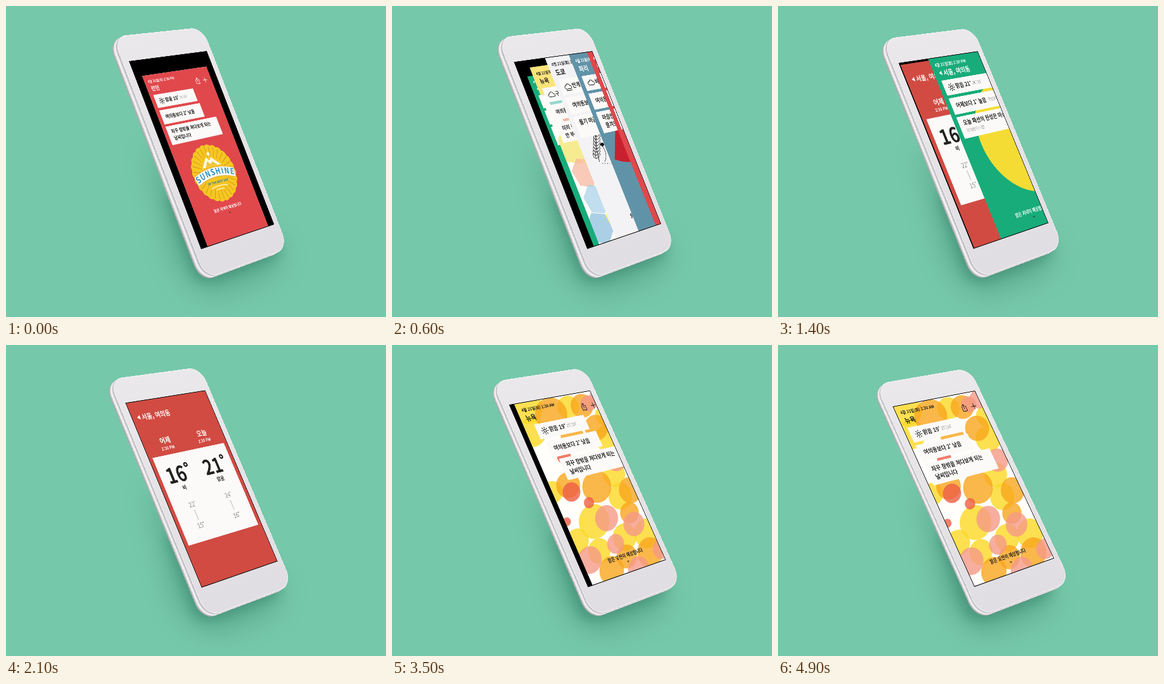
Animation of 600x491 px, one loop 5000 ms. Source, as an HTML page:

```html
<!DOCTYPE html>
<html lang="ko">
<head>
<meta charset="utf-8">
<style>
html, body { margin: 0; width: 100%; height: 100%; overflow: hidden; background: #76c8aa; }
body { position: relative; }
.plane { position: absolute; left: 0; top: 0; width: 0; height: 0; transform-origin: 0 0; }
.body { position: absolute; left: -25px; top: -77px; width: 365px; height: 727px; border-radius: 50px; }
.face { background: linear-gradient(#eae8eb, #e4e2e5 60%, #e0dee2); box-shadow: inset 0 0 0 2px #f3f2f4; }
#shadow { position: absolute; left: 0; top: 0; }
#screen { position: absolute; left: 0; top: 0; width: 320px; height: 568px; overflow: hidden; background: #000; }
text { font-family: "Noto Sans CJK KR", "Noto Sans CJK", "Noto Sans", sans-serif; }
</style>
</head>
<body>
<svg id="shadow" width="600" height="491">
  <path d="M225 220L262 385Q285 455 340 452L425 420L435 380L320 300Z" fill="#2f7a62" opacity=".36" style="filter:blur(22px)"/>
  <path d="M250 300L295 425Q305 440 335 434L428 398L435 380L320 300Z" fill="#2f7a62" opacity=".42" style="filter:blur(9px)"/>
</svg>
<script>
const W = 320, H = 568, LOOP = 5000, SMALL = 0.83;
// Undoes the tilt of the plane, so that shapes given in stage pixels stand upright
const UPRIGHT = 'matrix(2.19 .49 -1.01 1.81 0 0)';
const clamp = v => Math.max(0, Math.min(1, v));
const smooth = v => { v = clamp(v); return v * v * (3 - 2 * v); };
const lerp = (a, b, p) => a + (b - a) * p;

// ---- drawing helpers ----
const txt = (x, y, size, fill, s, more = '') =>
  `<text x="${x}" y="${y + size * 0.36}" font-size="${size}" fill="${fill}" ${more}>${s}</text>`;
const mid = 'text-anchor="middle"', bold = 'font-weight="700"';
const circle = (x, y, r, fill, more = '') => `<circle cx="${x}" cy="${y}" r="${r}" fill="${fill}" ${more}/>`;
const rect = (x, y, w, h, fill) => `<rect x="${x}" y="${y}" width="${w}" height="${h}" fill="${fill}"/>`;
const line = (d, color, w = 2, more = '') => `<path d="${d}" fill="none" stroke="${color}" stroke-width="${w}" ${more}/>`;
const group = (id, s) => `<g id="${id}" clip-path="url(#sheet)">${s}</g>`;

const icons = {
  sun: circle(0, 0, 4.5, 'none', 'stroke="#222" stroke-width="2.4"') +
    circle(0, 0, 10, 'none', 'stroke="#222" stroke-width="4.5" stroke-dasharray="2.4 5.45"'),
  cloud: line('M-9 7h17a5 5 0 0 0 0-10a8 8 0 0 0-15-1a5.5 5.5 0 0 0-2 11z', '#222')
};
icons.fog = icons.cloud + line('M-11 12h22', '#222');

const cards = [[73, 48], [130, 52], [190, 68]];
const paper = (i, w, s) =>
  `<g class="card">${rect(17, cards[i][0], w, cards[i][1], '#fbfaf8')}${s}</g>`;
const word = (x, y, s) => txt(x, y, 18, '#222', s, bold);
const note = (x, y, s) => txt(x, y, 12.5, '#8d8d8d', s);

function page(id, o) {
  const ink = o.ink || '#fff', x = o.back ? 37 : 19;
  return group(id,
    rect(0, 0, W, 720, o.bg) + (o.art || '') +
    txt(16, 24, 13, ink, `4월 21일(화) ${o.time || '2:30 PM'}`, bold) +
    (o.back ? `<path d="M20 50L31 43V57Z" fill="${ink}"/>` : '') +
    txt(x, 50, 21, ink, o.city, bold) +
    line('M245 44H241V59H257V44H253M249 53V37M244.500 41L249 36.500L253.500 41M278 49H298M288 39V59', ink, 2) +
    paper(0, 195, `<g transform="translate(46 98)">${icons[o.icon]}</g>` + word(63, 97, o.now) + note(132, 97, o.range)) +
    paper(1, o.w2 || 200, word(35, 156, o.diff) + note(168, 156, o.more || '')) +
    paper(2, o.w3 || 255, word(35, 211, o.say[0]) + (o.sub ? note(38, 236, o.sub) : word(37, 236, o.say[1]))) +
    txt(160, 517, 14.5, ink, o.foot || '맑은 저녁이 예상됩니다', mid + ' ' + bold) +
    `<path d="M155 534H165L160 540Z" fill="#333" opacity=".75"/>`);
}

// ---- page artwork ----
function badge() {
  let d = '';
  for (let i = 0; i <= 144; i++) {
    const a = i / 144 * Math.PI * 2, r = 102 + 4 * Math.abs(Math.sin(a * 12));
    d += `${i ? 'L' : 'M'}${(160 + r * Math.cos(a)).toFixed(1)} ${(387 + r * Math.sin(a)).toFixed(1)}`;
  }
  return `<path d="${d}Z" fill="#f5c722"/>` +
    circle(160, 387, 79, 'none', 'stroke="#d9961f" stroke-width="38" stroke-dasharray="2.6 14.9"') +
    `<path d="M113 362L146 326L158 340L169 329L207 362Z" fill="#fff8e4"/>` +
    `<path d="M128 362L146 341L158 354L169 345L190 362Z" fill="#eec63a"/>` +
    circle(164, 316, 7, '#fff') +
    `<path d="M58 385Q160 347 262 385L256 420Q160 384 64 420Z" fill="#fdfaf2" stroke="#e2a526" stroke-width="2"/>` +
    `<path id="arc" d="M70 410Q160 378 250 410" fill="none"/>` +
    `<text font-size="31" font-weight="700" fill="#2b8fc4" letter-spacing="4" ${mid}>` +
    `<textPath href="#arc" startOffset="51%">SUNSHINE</textPath></text>` +
    txt(160, 421, 12, '#2477a8', 'OF THE BEST SKY', mid + ' ' + bold) +
    line('M118 440Q160 430 202 440M140 449Q160 444 180 449', '#fff4cf', 3);
}

// x, y on the page and radius in stage pixels
const blobs = {
  '#fcd926': [40, 20, 24, 20, 95, 22, 190, 40, 18, 318, 87, 17, 285, 160, 21, 250, 275, 19, 1, 281, 16, 102, 395, 25,
    237, 344, 20, 13, 436, 18, 74, 481, 18, 186, 465, 20, 275, 474, 22],
  '#f9a61f': [116, 52, 26, 244, 44, 19, 262, 120, 20, 157, 133, 19, 66, 272, 19, 166, 298, 24, 286, 334, 20,
    244, 400, 16, 163, 521, 17, 255, 531, 22, 88, 545, 20],
  '#f69a88': [272, 40, 13, 318, 30, 15, 282, 232, 18, 151, 396, 19, 242, 436, 18, 28, 497, 19, 143, 476, 14,
    304, 532, 15, 186, 567, 18],
  '#ee5f45': [67, 294, 14, 112, 338, 8, 6, 374, 6, 95, 186, 11]
};
function watercolor() {
  let s = '';
  for (const color in blobs) {
    const b = blobs[color];
    for (let i = 0; i < b.length; i += 3)
      s += `<g transform="translate(${b[i]} ${b[i + 1]}) ${UPRIGHT}"><ellipse rx="${b[i + 2] * 0.98}" ry="${b[i + 2] * 1.06}" ` +
        `fill="${color}" fill-opacity=".8" stroke="${color}" stroke-opacity=".5"/></g>`;
  }
  return s;
}

function hexes() {
  const hex = (x, y, r, fill) => {
    const p = [0, 1, 2, 3, 4, 5].map(k => [x + r * Math.cos(k * 1.0472 + 0.3), y + r * Math.sin(k * 1.0472 + 0.3)]);
    return `<polygon points="${p.join(' ')}" fill="${fill}" opacity=".72"/>`;
  };
  return hex(50, 30, 85, '#fbdc4a') + hex(190, 80, 90, '#f9e37a') + hex(60, 125, 40, '#6cc8bc') +
    hex(85, 185, 38, '#f09a86') + hex(45, 275, 62, '#f6e56a') + hex(55, 365, 52, '#f8b8a0') +
    hex(115, 335, 48, '#f7d37e') + hex(60, 455, 52, '#a9d3ea') + hex(30, 545, 55, '#8dbfe0') +
    hex(125, 530, 58, '#f8e34c') + hex(220, 420, 75, '#a5d8d0');
}

function leaf() {
  let s = line('M-3 -22Q-7 0 3 34', '#222', 0.9);
  for (let y = -15; y <= 26; y += 5)
    s += line(`M-3 ${y + 4}Q-9 ${y + 2} -8 ${y - 4}Q-4 ${y - 2} -3 ${y + 4}Q3 ${y + 2} 4 ${y - 4}`, '#333', 0.8);
  s += '<path d="M3 6Q7 0 11 6L8 10Z" fill="#111"/>' + line('M8 9Q18 22 12 34', '#333', 0.7) +
    line('M8 36H32', '#555', 0.9, 'stroke-dasharray="1.5 2.5"');
  return `<g transform="translate(80 275) ${UPRIGHT}">${s}</g>`;
}

const column = (x, day, time, deg, sky, hi, lo) =>
  txt(x, 131, 22, '#fff', day, mid + ' ' + bold) + txt(x, 155, 13, '#fff', time, mid + ' ' + bold) +
  txt(x, 238, 64, '#222', deg, mid + ' ' + bold) + txt(x, 280, 16, '#222', sky, mid + ' ' + bold) +
  txt(x + 3, 334, 20, '#888', hi, mid) + line(`M${x + 2} 350V382`, '#d8d8d8', 5) + txt(x + 3, 399, 20, '#888', lo, mid);

const detail = group('detail', rect(0, 0, W, 720, '#d14b42') +
  '<path d="M20 50L31 43V57Z" fill="#fff"/>' + txt(37, 50, 21, '#fff', '서울, 여의동', bold) +
  rect(15, 175, 290, 270, '#fbfaf8') +
  column(86, '어제', '2:30 PM', '16˚', '비', '22˚', '15˚') +
  column(234, '오늘', '2:30 PM', '21˚', '맑음', '24˚', '16˚'));

const sunny = { icon: 'sun', now: '맑음 19˚', range: '25˚/16˚', diff: '여의동보다 2˚ 낮음', say: ['자꾸 창밖을 쳐다보게 되는', '날씨입니다'] };
const art = `<clipPath id="sheet"><rect width="${W}" height="720"/></clipPath>` + detail +
  page('seoul', {
    bg: '#18ac7a', city: '서울, 여의동', back: true, icon: 'sun', now: '맑음 21˚', range: '24˚/16˚',
    diff: '어제보다 1˚ 높음', more: '작년보다 2˚ 낮음', w2: 273, w3: 300,
    say: ['오늘 패션의 완성은 마스크입니다'], sub: '미세먼지 나쁨',
    art: circle(258, 284, 187, '#f4dc35') + group('glow', circle(160, 369, 27, '#f8e566') +
      circle(160, 369, 33, 'none', 'stroke="#e3c52c" stroke-width="5" stroke-dasharray="2 4.9"'))
  }) +
  page('newyork', {
    bg: '#fdfcf8', ink: '#1d1d1d', city: '뉴욕', time: '1:30 AM', icon: 'cloud', now: '구름 18˚', range: '23˚/15˚',
    diff: '여의동보다 3˚ 낮음', say: ['미리 챙긴 우산이', '안 부러운 날입니다'], art: hexes(), foot: '맑은 오전이 예상됩니다'
  }) +
  page('tokyo', {
    bg: '#f3f3f5', ink: '#1d1d1d', city: '도쿄', icon: 'fog', now: '안개 17˚', range: '20˚/14˚',
    diff: '여의동보다 4˚ 낮음', say: ['물기 머금은 오후입니다', ''], art: leaf()
  }) +
  page('paris', {
    bg: '#6193a8', city: '파리', icon: 'cloud', now: '비 15˚', range: '17˚/11˚',
    diff: '여의동보다 6˚ 낮음', say: ['마음만은 맑게', '즐겨도 좋은 날'],
    art: '<path d="M85 225L18 342Q75 372 140 360Z" fill="#c9202f"/>'
  }) +
  page('london', { ...sunny, bg: '#e0484c', city: '런던', art: badge() }) +
  page('bright', {
    ...sunny, bg: '#fffefa', ink: '#1d1d1d', city: '뉴욕', time: '1:30 AM', art: watercolor(), foot: '맑은 오전이 예상됩니다'
  }) +
  `<rect width="${W}" height="${H}" fill="none" stroke="#111" stroke-width="4"/>`;

// ---- phone: stacked silhouettes give the metal edge ----
const rim = ['#a9a8ab', '#c9c8cb', '#eeedef', '#f3f2f4', '#d2d0d4', '#bcbabe'];
document.body.insertAdjacentHTML('beforeend',
  rim.map(c => `<div class="plane"><div class="body" style="background:${c}"></div></div>`).join('') +
  `<div class="plane"><div class="body face"></div>` +
  `<svg id="screen" viewBox="0 0 ${W} ${H}">${art}</svg></div>`);

const planes = [...document.querySelectorAll('.plane')];
const $ = id => document.getElementById(id);
const brightCards = [...$('bright').querySelectorAll('.card')];

// Screen corners clockwise from top left, at the start and end of the turn
const from = [194, 87, 317, 71, 423.5, 345, 308, 384];
const to = [181, 97, 311, 72, 436, 337, 310, 382];

function project(q) {
  const [x0, y0, x1, y1, x2, y2, x3, y3] = q;
  const ax = x1 - x2, bx = x3 - x2, sx = x0 - x1 + x2 - x3;
  const ay = y1 - y2, by = y3 - y2, sy = y0 - y1 + y2 - y3;
  const den = ax * by - bx * ay, g = (sx * by - bx * sy) / den, h = (ax * sy - sx * ay) / den;
  return `matrix3d(${[
    (x1 - x0 + g * x1) / W, (y1 - y0 + g * y1) / W, 0, g / W,
    (x3 - x0 + h * x3) / H, (y3 - y0 + h * y3) / H, 0, h / H,
    0, 0, 1, 0, x0, y0, 0, 1].map(v => v.toFixed(9))})`;
}

function place(id, x, k) {
  $(id).setAttribute('transform', `translate(${x + W / 2 * (1 - k)} ${H / 2 * (1 - k)}) scale(${k})`);
}
const show = (id, on) => $(id).setAttribute('display', on ? 'inline' : 'none');

function draw(t) {
  const turn = t / 4900, m = project(from.map((v, i) => lerp(v, to[i], turn)));
  planes.forEach((p, i) => {
    const k = 1 - i / rim.length;
    p.style.transform = `translate(${-lerp(8, 6, turn) * k}px, ${5 * k}px) ${m}`;
  });

  // Cards leave to the right one after another, growing from the stack
  ['london', 'paris', 'tokyo', 'newyork'].forEach((id, i) => {
    const s = smooth((t - 227 - 93 * i) / 450);
    place(id, s * W, lerp(SMALL, 1, clamp(s * 4.6)));
    show(id, s < 1);
  });

  const peek = smooth((t - 1240) / 400) - smooth((t - 2200) / 400);
  const grow = smooth((t - 750) / 350) - smooth((t - 3100) / 350);
  place('seoul', peek * W, lerp(SMALL, 1, grow));
  place('detail', 0, lerp(0.965, 1, peek));
  show('detail', peek > 0);
  $('glow').setAttribute('opacity', clamp((t - 2500) / 300));

  // The next page glides in and its cards trail behind
  const rest = lag => W * (1 - clamp((t - 3100 - lag) / 650)) ** 3;
  place('bright', rest(0), 1);
  brightCards.forEach((c, i) => c.setAttribute('transform', `translate(${rest(75 + 37 * i) - rest(0)} 0)`));
}

const begin = performance.now();
function tick() {
  const t = (performance.now() - begin) % LOOP;
  draw(Math.floor(t / 100) * 100);
  requestAnimationFrame(tick);
}
tick();
</script>
</body>
</html>
```
